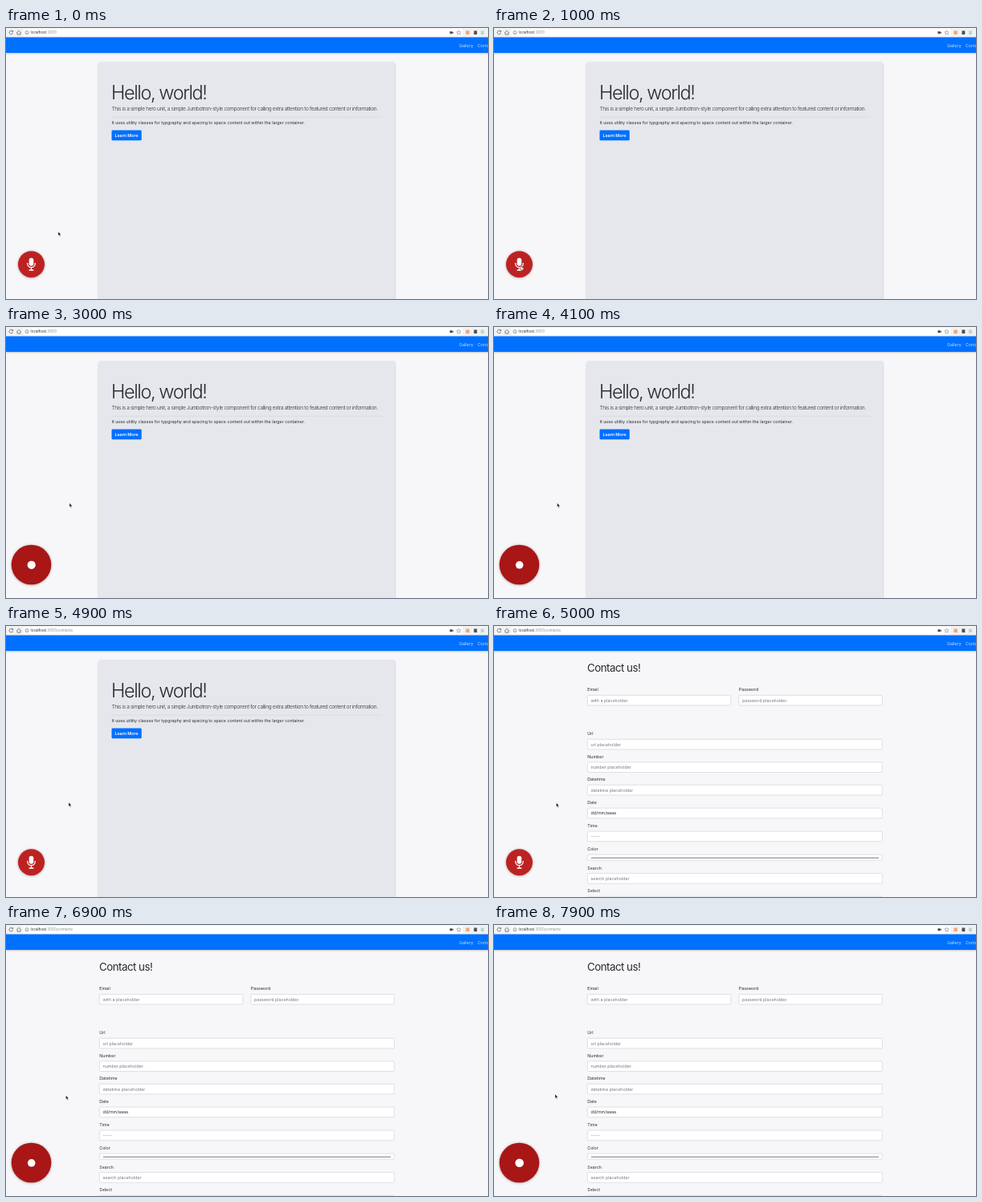
An HTML page for the animation above (8 s loop, 600 by 338 pixels).

```html
<!DOCTYPE html>
<html lang="en">
<head>
<meta charset="utf-8">
<title>Voice navigation</title>
<style>
html, body { margin: 0; width: 100%; height: 100%; overflow: hidden; background: #f7f6f9; }
svg { display: block; width: 600px; height: 338px; font: 5.3px Inter, "Open Sans", sans-serif; fill: #292b2f; }
.field rect { fill: #fff; stroke: #d3d5da; stroke-width: .7; }
.hint { fill: #70777f; }
.nav { fill: #c4deff; }
</style>
</head>
<body>
<svg viewBox="0 0 600 338">
  <defs>
    <filter id="soft" x="-30%" y="-30%" width="160%" height="160%">
      <feDropShadow dx="0" dy=".4" stdDeviation="1.4" flood-opacity=".38"/>
    </filter>
    <filter id="edge" x="-5%" y="-40%" width="110%" height="180%">
      <feDropShadow dx="0" dy=".6" stdDeviation="1" flood-opacity=".28"/>
    </filter>
  </defs>
  <rect width="600" height="338" fill="#f7f6f9"/>

  <g id="home">
    <rect x="115.5" y="43" width="368.5" height="310" rx="2" fill="#e5e7ec" filter="url(#edge)"/>
    <text x="131" y="88.5" font-size="23.5" font-weight="300" letter-spacing="-1.4">Hello, world!</text>
    <text x="131.5" y="103.3" font-size="6.5" font-weight="300" letter-spacing="-.33">This is a simple hero unit, a simple Jumbotron-style component for calling extra attention to featured content or information.</text>
    <path d="M132 111.2H467.5" stroke="#d3d5da" stroke-width=".6"/>
    <text x="131.5" y="120.3">It uses utility classes for typgraphy and spacing to space content out within the larger container.</text>
    <rect x="131.5" y="127.5" width="37.2" height="12.7" rx="1.2" fill="#006fff"/>
    <text x="150" y="135.8" fill="#fff" font-weight="600" text-anchor="middle">Learn More</text>
  </g>

  <g id="contact">
    <text x="116" y="56.6" font-size="13.3" letter-spacing="-.5">Contact us!</text>
  </g>

  <rect y="11" width="600" height="20" fill="#006fff" filter="url(#edge)"/>
  <text class="nav" x="564" y="23.6">Gallery</text>
  <text class="nav" x="587" y="23.6">Contacts</text>
  <rect width="600" height="11.5" fill="#f2f2f3"/>
  <rect x="21.5" y="1" width="547" height="9.5" rx="1" fill="#fff"/>
  <g fill="none" stroke="#65686c" stroke-width=".8">
    <path d="M8.2 4.2A2.3 2.3 0 1 0 8.6 6.3M8.6 3V4.8H6.8"/>
    <path d="M13.2 6L16 3.3L18.8 6M14.1 5.5V8.2H17.9V5.5"/>
    <circle cx="26" cy="5.7" r="2.1" stroke-width=".6"/>
    <path d="M26 5.4V7M26 4.2V4.8" stroke-width=".6"/>
    <path d="M563.5 3.1l.8 1.7 1.9.2-1.4 1.3.4 1.9-1.7-1-1.7 1 .4-1.9-1.4-1.3 1.9-.2z" stroke-width=".5"/>
  </g>
  <path d="M552.5 4.2h2.8v1l1.4-.8v2.7l-1.4-.8v1h-2.8z" fill="#444"/>
  <rect x="572.3" y="3.5" width="4.6" height="4.6" fill="#f0a876"/>
  <rect x="582.5" y="3.5" width="3.8" height="4.6" fill="#4a4d50"/>
  <rect x="591" y="3.5" width="4.2" height="4.6" fill="#b5dccb"/>
  <text x="30.6" y="7.4" font-size="4.55">localhost<tspan fill="#888">:3000<tspan id="path"></tspan></tspan></text>

  <circle id="button" cx="31.5" filter="url(#soft)"/>
  <g id="mic" fill="none" stroke="#fff" stroke-width="1.3">
    <rect x="28.7" y="286.8" width="5.6" height="10" rx="2.8" fill="#fff" stroke="none"/>
    <path d="M26.8 293v1a4.7 4.7 0 0 0 9.4 0v-1M31.5 299v3M28.6 302h5.8"/>
  </g>
  <circle id="pulse" cx="31.7" cy="296.8" fill="#fff"/>
  <g id="cursor">
    <path id="arrow" d="M0 0V5L1.2 4L2 5.9L2.9 5.5L2.1 3.7H3.6Z" fill="#111" stroke="#fff" stroke-width=".4"/>
    <path id="hand" d="M0 .5Q.6-.3 1.1.5V2.2L3.7 2.8Q4.2 4.8 3.2 5.8H.7L-1 3.5Q-.8 2.8 0 3.3Z" fill="#fff" stroke="#333" stroke-width=".5"/>
  </g>
</svg>
<script>
const LOOP = 8000;
const $ = id => document.getElementById(id);
const clamp = x => Math.max(0, Math.min(1, x));
const ease = x => x * x * (3 - 2 * x);
const ramp = (t, start, length) => ease(clamp((t - start) / length));
const show = (id, on) => $(id).style.display = on ? '' : 'none';

function field(label, hint, y, x = 116.3, w = 367, h = 12.6) {
  const body = hint === null
    ? `<path d="M121 ${y + 9.3}H479" stroke="#777" stroke-width="1.1"/>`
    : `<text class="${label === 'Date' ? '' : 'hint'}" x="${x + 4.2}" y="${y + 13.3}">${hint}</text>`;
  $('contact').innerHTML += `<g class="field"><text x="${x}" y="${y}">${label}</text>
    <rect x="${x}" y="${y + 5.1}" width="${w}" height="${h}" rx="1.2"/>${body}</g>`;
}
field('Email', 'with a placeholder', 81.3, 116.3, 178.5);
field('Password', 'password placeholder', 81.3, 304.8, 178.5);
field('Url', 'url placeholder', 136.2);
field('Number', 'number placeholder', 164.8);
field('Datetime', 'datetime placeholder', 193.2);
field('Date', 'dd/mm/aaaa', 222);
field('Time', '--:--', 251);
field('Color', null, 280, 116.3, 367, 7);
field('Search', 'search placeholder', 303.5);
field('Select', '', 332.2);

// Pointer stops: time, x, y
const stops = [
  [0, 65, 254], [300, 65, 254], [1000, 33, 296], [2000, 33, 296], [2600, 79, 219.5],
  [4800, 78.5, 219.5], [5000, 77.5, 220.5], [5700, 33, 296], [6300, 33, 296],
  [6800, 74.5, 212.5], [7700, 74.5, 212.5], [7900, 76, 211], [8000, 76, 211]
];

function pointer(t) {
  const i = stops.findIndex(s => s[0] > t);
  const [a, b] = [stops[i - 1], stops[i]];
  const k = ramp(t, a[0], b[0] - a[0]);
  return [a[1] + (b[1] - a[1]) * k, a[2] + (b[2] - a[2]) * k];
}

function draw(t) {
  show('home', t < 5000);
  show('contact', t >= 5000);
  $('path').textContent = t < 4900 ? '' : '/contacts';

  const grow = ramp(t, 1400, 300) - ramp(t, 4500, 300) + ramp(t, 6000, 300);
  const listening = t >= 1400 && t < 4500 || t >= 6000;
  $('button').setAttribute('r', 16.5 + 8.3 * grow);
  $('button').setAttribute('cy', 294.7 + 1.8 * grow);
  $('button').setAttribute('fill', `rgb(${188 - 20 * grow},${32 - 11 * grow},${32 - 9 * grow})`);
  show('mic', !listening);
  show('pulse', listening);
  const heard = t - (t < 6000 ? 1400 : 6000);
  $('pulse').setAttribute('r', 4.8 - .6 * Math.cos(heard / 1200 * 2 * Math.PI));

  const [x, y] = pointer(t);
  const over = Math.hypot(x - 31.5, y - 295) < 17 + 8 * grow;
  $('cursor').setAttribute('transform', `translate(${x} ${y})`);
  show('arrow', !over);
  show('hand', over);
}

function tick() {
  draw(performance.now() % LOOP);
  requestAnimationFrame(tick);
}
tick();
</script>
</body>
</html>
```
